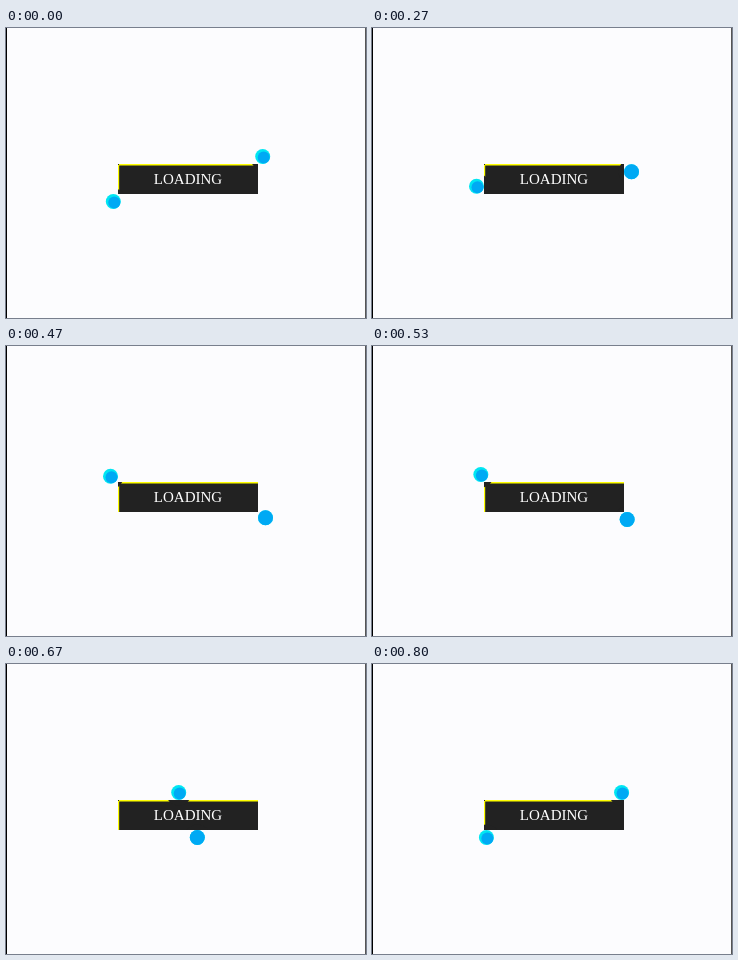
An HTML page for the animation above (0.87 s loop, 360 by 290 pixels).

```html
<!DOCTYPE html>
<html lang="en">
<head>
<meta charset="utf-8">
<title>Loading</title>
<style>
  html, body { margin: 0; width: 100%; height: 100%; overflow: hidden; background: #fcfcfe; }
  svg { display: block; width: 360px; height: 290px; }
  text { font: 15px "Liberation Serif", "Times New Roman", serif; fill: #fff; text-anchor: middle; }
</style>
</head>
<body>
<svg viewBox="0 0 360 290">
  <defs>
    <clipPath id="box"><rect x="112" y="136" width="140" height="30"/></clipPath>
  </defs>
  <rect width="360" height="290" fill="#fcfcfe"/>
  <rect width="1" height="290" fill="#000"/>
  <rect x="359" width="1" height="290" fill="#555"/>
  <g clip-path="url(#box)">
    <rect x="112" y="136" width="140" height="30" fill="#222"/>
    <rect x="113" y="136" width="139" height="1.5" fill="#ff0"/>
    <rect x="112" y="137" width="1.2" height="29" fill="#ff0"/>
    <circle class="shade" r="13" fill="#222"/>
    <circle class="shade" r="13" fill="#222"/>
  </g>
  <text x="182" y="156">LOADING</text>
  <g class="ball"><circle r="7.5" fill="#00e6f2"/><circle class="core" fill="#00a9f4"/></g>
  <g class="ball"><circle r="7.5" fill="#00e6f2"/><circle class="core" fill="#00a9f4"/></g>
</svg>
<script>
  const LOOP = 870;
  const LEFT = 104.5, RIGHT = 259.5, TOP = 128.5, BOTTOM = 173.5;

  // [ms, progress]: 0..1 runs down the right side, 1..2 along the bottom
  const STEPS = [
    [0, -0.018], [130, 0], [200, 0.13], [270, 0.34], [330, 0.59], [400, 0.82],
    [470, 0.96], [530, 1.028], [600, 1.18], [670, 1.44], [730, 1.74], [800, 1.936]
  ];

  const shades = document.querySelectorAll(".shade");
  const balls = document.querySelectorAll(".ball");
  const clamp = v => Math.min(1, Math.max(0, v));

  function place(p) {
    const across = p < 0 ? -p : Math.max(0, p - 1);
    return [RIGHT - (RIGHT - LEFT) * across, TOP + (BOTTOM - TOP) * clamp(p)];
  }

  function drawBall(i, x, y) {
    const lit = 1 - clamp((x - 112) / 70) * clamp((y - TOP) / 12);
    const core = balls[i].querySelector(".core");
    balls[i].setAttribute("transform", `translate(${x} ${y})`);
    core.setAttribute("r", 7.5 - 1.5 * lit);
    core.setAttribute("cx", lit);
    core.setAttribute("cy", lit);
    shades[i].setAttribute("cx", x);
    shades[i].setAttribute("cy", y);
  }

  function draw(now) {
    const t = now % LOOP;
    const [, p] = STEPS.filter(([ms]) => ms <= t).pop();
    const [x, y] = place(p);
    drawBall(0, x, y);
    drawBall(1, LEFT + RIGHT - x, TOP + BOTTOM - y);
  }

  let start;
  function tick(now) {
    start ??= now;
    draw(Math.max(0, now - start));
    requestAnimationFrame(tick);
  }

  draw(0);
  requestAnimationFrame(tick);
</script>
</body>
</html>
```
